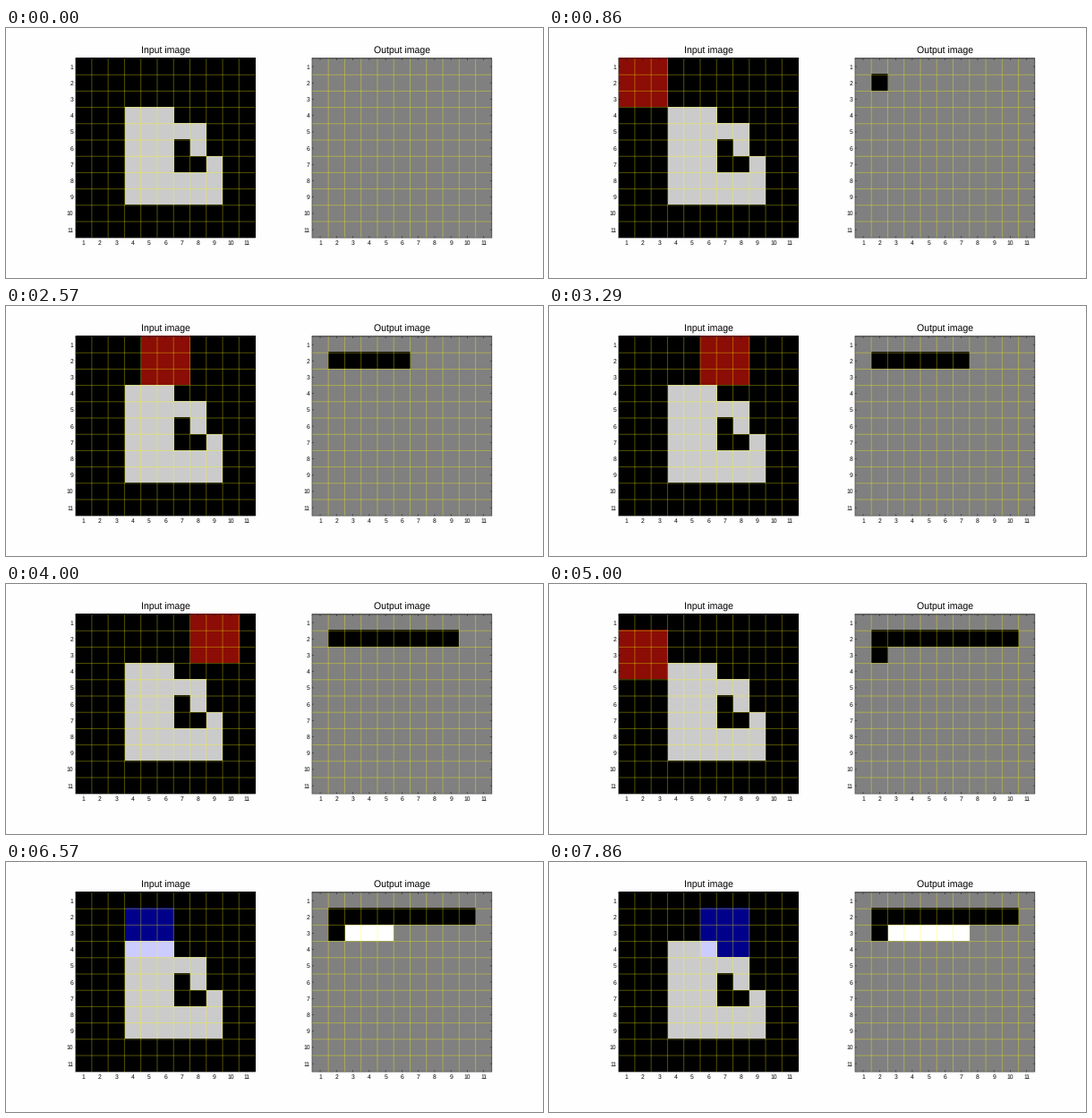
Write a matplotlib script that moves like this. It is 600 by 279 pixels and loops after 8 s.

```python
import numpy as np
import matplotlib.pyplot as plt
from matplotlib.animation import FuncAnimation

WIDTH, HEIGHT, DPI = 600, 279, 96
PX = 72 / DPI                       # one pixel in points
N, CELL_W, CELL_H = 11, 18.27, 18.2
LEFT_IN, LEFT_OUT, TOP = 77.6, 341.9, 34
BOTTOM = TOP + N * CELL_H
INTERVAL, LOOP = 50, 8000           # ms
HALF_STEP = 550                     # ms into each second of the second scan step

LIGHT, GRAY = 203, 128
RED, BLUE, PALE_BLUE = (139, 13, 5), (0, 0, 139), (204, 204, 255)

plt.rcParams["font.family"] = "Liberation Sans"
plt.rcParams["text.hinting"] = "none"

shape = np.zeros((N, N), bool)
shape[3:9, 3:6] = True
shape[4, 6:8] = True
shape[5, 7] = True
shape[6, 8] = True
shape[7:9, 6:9] = True

fig = plt.figure(figsize=(WIDTH / DPI, HEIGHT / DPI), dpi=DPI, facecolor="#fefefe")
ax = fig.add_axes([0, 0, 1, 1])


def gray_to_rgb(values):
    return np.repeat(np.asarray(values, np.uint8)[..., None], 3, axis=2)


def make_panel(left, title):
    right = left + N * CELL_W
    image = ax.imshow(gray_to_rgb(np.zeros((N, N))), extent=(left, right, BOTTOM, TOP),
                      interpolation="nearest", aspect="auto", zorder=1)
    edges = np.arange(1, N)
    grid = dict(colors="#ffff00", alpha=0.33, linewidth=PX, zorder=2, snap=False)
    ax.vlines(left + edges * CELL_W, TOP, BOTTOM, **grid)
    ax.hlines(TOP + edges * CELL_H, left, right, **grid)

    centers = np.arange(N) + 0.5
    xs, ys = left + centers * CELL_W, TOP + centers * CELL_H
    tick = dict(colors="black", alpha=0.6, linewidth=0.7 * PX, zorder=3, snap=False)
    for start, end in ((TOP, TOP + 2), (BOTTOM - 2, BOTTOM)):
        ax.vlines(xs, start, end, **tick)
    for start, end in ((left, left + 2), (right - 2, right)):
        ax.hlines(ys, start, end, **tick)
    ax.plot([left, right, right, left, left], [TOP, TOP, BOTTOM, BOTTOM, TOP],
            color="black", alpha=0.6, lw=0.7 * PX, zorder=3, snap=False)

    label = dict(va="baseline", size=6.8 * PX)
    for i, (x, y) in enumerate(zip(xs, ys), 1):
        ax.text(x, 242.3, str(i), ha="center", **label)
        ax.text(left - 2.4, y + 2.4, str(i), ha="right", **label)
    ax.text((left + right) / 2, 28.6, title, ha="center", va="baseline", size=10.5 * PX)
    return image


input_image = make_panel(LEFT_IN, "Input image")
output_image = make_panel(LEFT_OUT, "Output image")
ax.set_xlim(0, WIDTH)
ax.set_ylim(HEIGHT, 0)
ax.axis("off")


def window_at(step):
    """Center cell and 3x3 neighbourhood of a scan step, row by row."""
    row, col = divmod(step, N - 2)
    row, col = row + 1, col + 1
    return (row, col), (slice(row - 1, row + 2), slice(col - 1, col + 2))


def update(frame):
    second, ms = divmod(frame * INTERVAL, 1000)
    done = 2 * second + (ms >= HALF_STEP)
    source = gray_to_rgb(shape * LIGHT)
    result = np.full((N, N), GRAY)
    for step in range(done):
        center, window = window_at(step)
        result[center] = 255 if shape[window].any() else 0
    if done:
        covered = shape[window]
        tint = BLUE if covered.any() else RED
        source[window] = np.where(covered[..., None], PALE_BLUE, tint)
    input_image.set_data(source)
    output_image.set_data(gray_to_rgb(result))
    return input_image, output_image


animation = FuncAnimation(fig, update, frames=LOOP // INTERVAL, interval=INTERVAL,
                          repeat=True, repeat_delay=0, blit=False)
plt.show()
```
